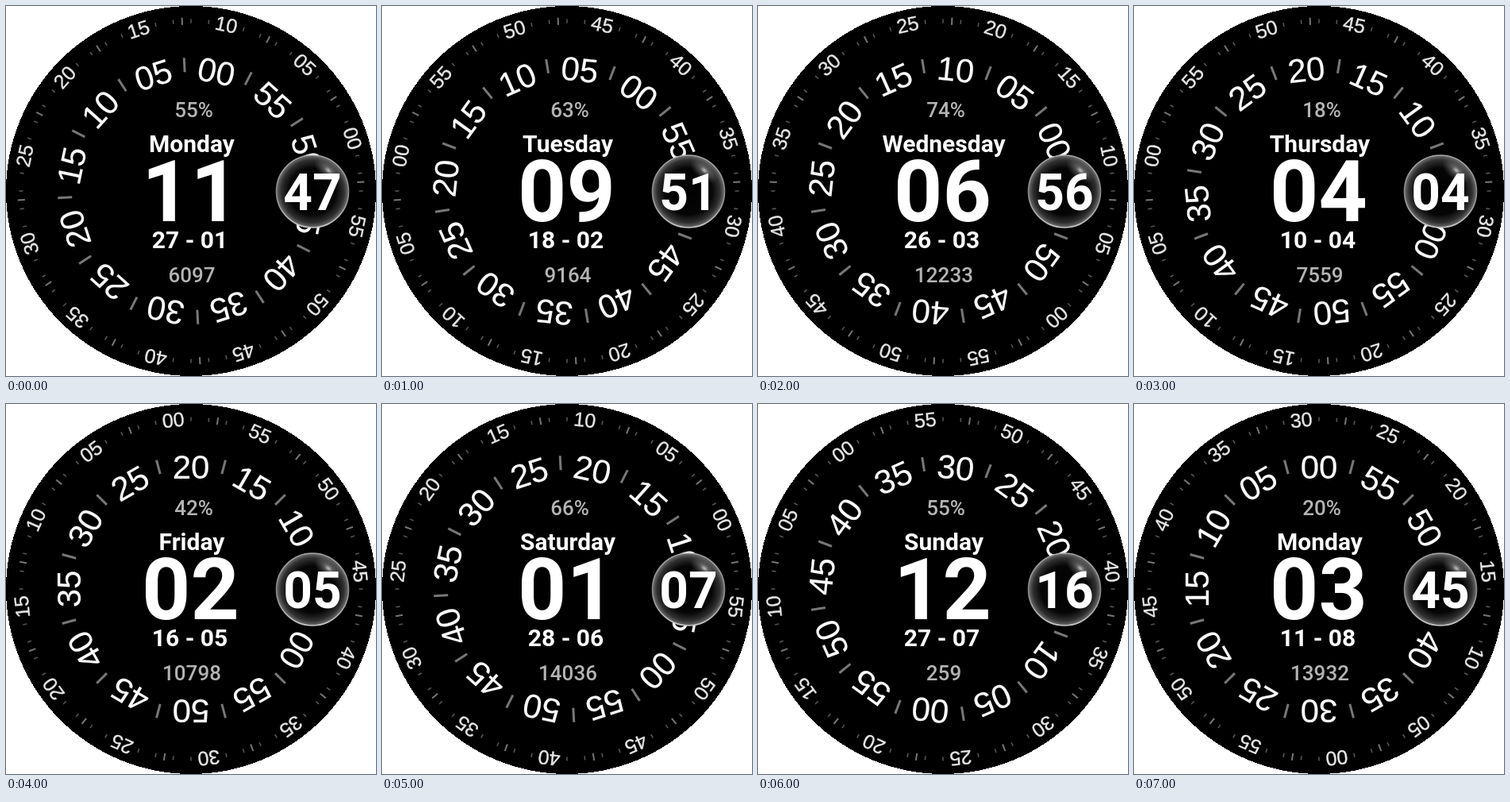
Recreate the animation shown at these times as an HTML page. Size 466 by 466 pixels, loop 8000 ms.

```html
<!DOCTYPE html>
<html lang="en">
<head>
<meta charset="utf-8">
<title>Watch face</title>
<style>
html, body { margin: 0; width: 100%; height: 100%; overflow: hidden; background: #fff; }
svg { display: block; width: 466px; height: 466px; font-family: Roboto, sans-serif; font-weight: 700; }
text { text-anchor: middle; fill: #fff; }
.ring { font-family: "Liberation Sans", Arial, sans-serif; font-weight: 400; }
.info { font-size: 26px; font-weight: 500; fill: #b4b4b4; }
</style>
</head>
<body>
<svg viewBox="0 0 466 466">
  <defs>
    <radialGradient id="glass">
      <stop offset="0" stop-color="#000"/>
      <stop offset=".65" stop-color="#060606"/>
      <stop offset=".87" stop-color="#303030"/>
      <stop offset="1" stop-color="#707070"/>
    </radialGradient>
    <radialGradient id="glow">
      <stop offset="0" stop-color="#fff" stop-opacity=".75"/>
      <stop offset=".3" stop-color="#bbb" stop-opacity=".4"/>
      <stop offset="1" stop-color="#888" stop-opacity="0"/>
    </radialGradient>
    <linearGradient id="rim" x1="0" y1="0" x2="0" y2="1">
      <stop offset="0" stop-color="#aaa"/>
      <stop offset=".5" stop-color="#888"/>
      <stop offset="1" stop-color="#c8c8c8"/>
    </linearGradient>
  </defs>
  <circle cx="233" cy="233" r="233" shape-rendering="crispEdges"/>
  <g id="outer" class="ring" font-size="25"></g>
  <g id="inner" class="ring" font-size="42"></g>
  <text id="power" class="info" x="236.5" y="140"></text>
  <text id="day" x="234" y="184" font-size="30"></text>
  <text id="hour" x="232.5" y="271" font-size="107"></text>
  <text id="date" x="231.5" y="305" font-size="30"></text>
  <text id="steps" class="info" x="234" y="348"></text>
  <circle cx="386" cy="233.5" r="45.5" fill="url(#glass)" stroke="url(#rim)" stroke-width="1.6"/>
  <ellipse cx="406" cy="207" rx="21" ry="12" fill="url(#glow)" transform="rotate(40 406 207)"/>
  <text id="minute" x="386" y="257" font-size="64"></text>
</svg>
<script>
const NS = "http://www.w3.org/2000/svg";
const $ = id => document.getElementById(id);
const pad = n => String(n).padStart(2, "0");
const STEP = 1000;

// day, hour, minute, second, date, battery, steps
const states = [
  ["Monday", 11, 47, 57, "27 - 01", 55, 6097],
  ["Tuesday", 9, 51, 32, "18 - 02", 63, 9164],
  ["Wednesday", 6, 56, 8, "26 - 03", 74, 12233],
  ["Thursday", 4, 4, 32, "10 - 04", 18, 7559],
  ["Friday", 2, 5, 44, "16 - 05", 42, 10798],
  ["Saturday", 1, 7, 56, "28 - 06", 66, 14036],
  ["Sunday", 12, 16, 39, "27 - 07", 55, 259],
  ["Monday", 3, 45, 14, "11 - 08", 20, 13932]
];

function add(parent, tag, attrs, label) {
  const el = document.createElementNS(NS, tag);
  for (const k in attrs) el.setAttribute(k, attrs[k]);
  if (label) el.textContent = label;
  parent.appendChild(el);
}

function tick(ring, angle, r, length, width, color) {
  add(ring, "line", {
    x1: 233, x2: 233, y1: 233 - r - length / 2, y2: 233 - r + length / 2,
    stroke: color, "stroke-width": width, transform: `rotate(${angle} 233 233)`
  });
}

function numbers(ring, r, color, weight) {
  for (let n = 0; n < 60; n += 5) {
    add(ring, "text", {
      x: 233, y: 233 - r, dy: ".345em", transform: `rotate(${-6 * n} 233 233)`,
      style: `fill:${color};stroke:${color};stroke-width:${weight}`
    }, pad(n));
  }
}

numbers($("inner"), 153.5, "#fff", 0.2);
numbers($("outer"), 214, "#e6e6e6", 0.4);
for (let a = 0; a < 360; a += 30) {
  tick($("inner"), a + 15, 159, 18, 3, "#777");
  tick($("outer"), a + 15, 214, 9, 2, "#777");
  for (const k of [6, 12, 18, 24]) tick($("outer"), a + k, 214, 5, 1.6, "#555");
}

const turn = (ring, value) =>
  ring.setAttribute("transform", `rotate(${90 + 6 * value} 233 233)`);

let shown = -1;
function draw(time) {
  const i = Math.floor(time / STEP) % states.length;
  if (i === shown) return;
  shown = i;
  const [day, hour, minute, second, date, power, steps] = states[i];
  $("day").textContent = day;
  $("hour").textContent = pad(hour);
  $("minute").textContent = pad(minute);
  $("date").textContent = date;
  $("power").textContent = power + "%";
  $("steps").textContent = steps;
  turn($("inner"), minute);
  turn($("outer"), second);
}

const start = performance.now();
function loop() {
  draw(performance.now() - start);
  requestAnimationFrame(loop);
}
loop();
</script>
</body>
</html>
```
